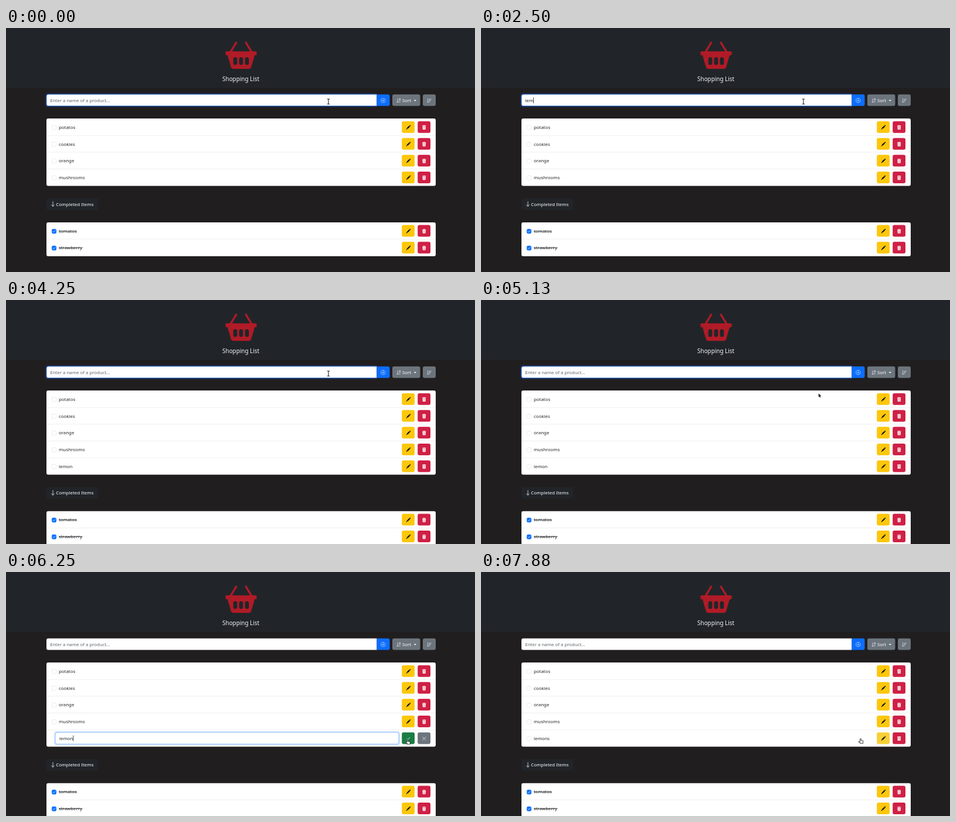
Write an HTML page with a canvas that moves like this. It is 800 px wide and 418 px high and loops after 8 s.

```html
<!DOCTYPE html>
<html lang="en">
<head>
<meta charset="utf-8">
<title>Shopping List</title>
<style>
html, body { margin: 0; width: 100%; height: 100%; overflow: hidden; background: #211e20; }
canvas { display: block; width: 800px; height: 418px; }
</style>
</head>
<body>
<canvas id="stage"></canvas>
<script>
const canvas = document.getElementById('stage');
const ctx = canvas.getContext('2d');
const ratio = window.devicePixelRatio || 1;
canvas.width = 800 * ratio;
canvas.height = 418 * ratio;

const LOOP = 8000, STEP = 125;
const ROW = 28.75, LEFT = 69, WIDTH = 664, LIST = 155.1, BAR = 113.7;
const INK = '#212529', PAGE = '#211e20', BLUE = '#0d6efd', GRAY = '#6c757d', RED = '#cf2045';
const YELLOW = '#fcc70b', YELLOW_HOVER = '#f7d036', GREEN = '#229150', GREEN_HOVER = '#1b7c45';
const TODO = ['potatos', 'cookies', 'orange', 'mushrooms'];
const DONE = ['tomatos', 'strawberry'];

// Moments of the story, in ms
const CLEAR = 4000, ADD = 4250, EDIT = 6250, PLURAL = 7000, SAVE = 7750;

// Pointer stops, and the moves between them
const field = { x: 550, y: 126 }, edge = { x: 680, y: 295 }, target = { x: 685, y: 287 };
const rest = { x: 661.5, y: 302 }, away = { x: 647.5, y: 285.5 };
const MOVES = [
  { start: 4875, end: 5750, to: edge },
  { start: 5750, end: 5875, to: target },
  { start: 6375, end: 6750, to: rest },
  { start: 7250, end: 7500, to: target },
  { start: 7750, end: 7875, to: away }
];

function pointer(t) {
  let { x, y } = field;
  for (const { start, end, to } of MOVES) {
    const k = Math.min(1, Math.max(0, (t - start) / (end - start)));
    const ease = k * k * (3 - 2 * k);
    x += (to.x - x) * ease;
    y += (to.y - y) * ease;
  }
  return [x, y];
}

// Letters typed so far in a run of keys that starts at a given time
function keys(t, start, count) {
  return Math.min(count, Math.max(0, Math.floor((t - start) / 250) + 1));
}

function box(x, y, w, h, r, fill, stroke, width = 0.5) {
  ctx.beginPath();
  ctx.roundRect(x, y, w, h, r);
  if (fill) { ctx.fillStyle = fill; ctx.fill(); }
  if (stroke) { ctx.strokeStyle = stroke; ctx.lineWidth = width; ctx.stroke(); }
}

function text(str, x, y, color = INK, size = 7.85, align = 'left') {
  ctx.font = `${size}px "Noto Sans", "Open Sans", sans-serif`;
  ctx.textAlign = align;
  ctx.fillStyle = color;
  ctx.fillText(str, x, y);
  return ctx.measureText(str).width;
}

function line(color, width, ...points) {
  ctx.strokeStyle = color;
  ctx.lineWidth = width;
  ctx.lineCap = ctx.lineJoin = 'round';
  ctx.beginPath();
  points.forEach(([x, y]) => ctx.lineTo(x, y));
  ctx.stroke();
}

function poly(color, ...points) {
  ctx.fillStyle = color;
  ctx.beginPath();
  points.forEach(([x, y]) => ctx.lineTo(x, y));
  ctx.closePath();
  ctx.fill();
}

// Runs a drawing in local units around x, y
function place(x, y, scale, draw, angle = 0) {
  ctx.save();
  ctx.translate(x, y);
  ctx.rotate(angle);
  ctx.scale(scale, scale);
  draw();
  ctx.restore();
}

// Icons live on a 16 unit grid around their centre
const icon = (draw, x, y, size = 8.2) => place(x, y, size / 16, draw);

// Vertical arrow; dir is 1 for down and -1 for up
function shaft(x, dir, width, head = 3) {
  const tip = 6.5 * dir;
  line('#fff', width, [x, -tip], [x, tip]);
  line('#fff', width, [x - head, tip - head * dir], [x, tip], [x + head, tip - head * dir]);
}

const icons = {
  basket() {
    const red = '#b01b27';
    for (const side of [-1, 1]) line(red, 1, [2.5 * side, -6.5], [5.5 * side, -1.5]);
    box(-8, -2, 16, 2, 0.5, red);
    poly(red, [-7, -0.2], [7, -0.2], [5.1, 6.4], [4.3, 7], [-4.3, 7], [-5.1, 6.4]);
    for (const x of [-3, 0, 3]) box(x - 1, 1, 2, 4, 1, INK);
  },
  pencil() {
    place(0, 0, 1, () => {
      box(-2, -10, 4, 3, 0.6, '#000');
      box(-2, -6, 4, 11, 0, '#000');
      poly('#000', [-2, 6], [2, 6], [0, 10]);
    }, Math.PI / 4);
  },
  trash() {
    box(-6.5, -6.4, 13, 1.9, 0.8, '#fff');
    box(-2.5, -7.7, 5, 2, 0.8, '#fff');
    poly('#fff', [-5.6, -3.6], [5.6, -3.6], [4.8, 7.5], [-4.8, 7.5]);
    for (const x of [-2.4, 0, 2.4]) line(RED, 0.7, [x, -1.8], [x, 5]);
  },
  plus() {
    box(-7.4, -7.4, 14.8, 14.8, 7.4, null, '#fff', 1);
    line('#fff', 1, [0, -3.5], [0, 3.5]);
    line('#fff', 1, [-3.5, 0], [3.5, 0]);
  },
  swap() {
    shaft(-3.5, 1, 1.2);
    shaft(3.5, -1, 1.2);
  },
  sort() {
    shaft(-4.5, 1, 1.1, 2);
    for (let i = 0; i < 4; i++) line('#fff', 1, [-0.5, 3 * i - 4.5], [6.5 - 2 * i, 3 * i - 4.5]);
  },
  down() { shaft(0, 1, 1.2, 4); },
  check() { line('#fff', 1.6, [-5, 0.5], [-1.5, 4], [5, -3.8]); },
  cross() {
    for (const s of [-5.5, 5.5]) line('#fff', 1.3, [-s, -5.5], [s, 5.5]);
  }
};

const cursors = {
  beam() {
    for (const [color, width] of [['#fff', 2.4], ['#222', 1.1]]) {
      line(color, width, [0, -4], [0, 4]);
      for (const y of [-4.3, 4.3]) line(color, width, [-1.8, y], [1.8, y]);
    }
  },
  arrow() {
    const shape = [[0, 0.5], [0, 7], [1.6, 5.7], [2.7, 8], [3.6, 7.6], [2.6, 5.2], [4.7, 5], [0, 0.5]];
    line('#fff', 1.6, ...shape);
    poly('#222', ...shape);
  },
  hand() {
    for (const [grow, color] of [[0.5, '#222'], [-0.3, '#fff']]) {
      const part = (x, y, w, h) => box(x - grow, y - grow, w + 2 * grow, h + 2 * grow, 1, color);
      part(-0.7, 0.2, 1.5, 6);
      part(-0.7, 3.5, 4.8, 4.5);
      part(-3, 4.7, 3.5, 1.6);
    }
  }
};

function button(y, x, color, draw) {
  box(x, y - 10, 21.8, 20, 3, color);
  icon(draw, x + 11, y + 0.5, 8);
}

function caret(x, y) {
  ctx.fillStyle = INK;
  ctx.fillRect(x, y - 5, 0.8, 10);
}

function item(name, y, done, hover) {
  box(78.3, y - 3, 7.4, 7.4, 2, done ? BLUE : '#fff', done ? BLUE : '#dcdfe3', 0.6);
  if (done) icon(icons.check, 82, y + 0.7, 6.5);
  const w = text(name, 90, y + 3);
  if (done) line(INK, 0.7, [90, y + 0.5], [90 + w, y + 0.5]);
  button(y, 675.2, hover ? YELLOW_HOVER : YELLOW, icons.pencil);
  button(y, 702.2, RED, icons.trash);
}

function editor(str, y, hover) {
  box(82.2, y - 11.8, 589.6, 23.6, 4.5, '#c2dbfe');
  box(84.2, y - 9.8, 585.6, 19.6, 3, '#fff', '#86b7fe', 0.6);
  caret(91 + text(str, 91, y + 3), y + 0.2);
  button(y, 675.2, hover ? GREEN_HOVER : GREEN, icons.check);
  button(y, 702.2, GRAY, icons.cross);
}

function list(top, count, drawRow) {
  box(LEFT, top, WIDTH, count * ROW + 0.5, 3, '#fff');
  for (let i = 0; i < count; i++) {
    const y = top + i * ROW;
    ctx.fillStyle = '#dfe0e2';
    if (i) ctx.fillRect(LEFT, y, WIDTH, 0.5);
    drawRow(i, y + 14.7);
  }
}

function header() {
  ctx.fillStyle = INK;
  ctx.fillRect(0, 0, 800, 102.5);
  icon(icons.basket, 401, 46.7, 53.2);
  text('Shopping List', 400.6, 91, '#f4f5f6', 9.9, 'center');
}

function toolbar(t) {
  const focus = t < EDIT, middle = 124.2, base = 126.8, h = 19.8;
  if (focus) box(67, BAR - 2, 567, h + 4, 4.5, '#1a3058');
  box(LEFT, BAR, 563.5, h, [3, 0, 0, 3], '#fff');
  box(632.5, BAR, 22, h, [0, 3, 3, 0], BLUE);
  if (focus) box(LEFT, BAR, 563.5, h, [3, 0, 0, 3], null, '#3470cc', 0.9);
  icon(icons.plus, 643.3, middle);

  const letters = t < CLEAR ? keys(t, 2000, 3) + keys(t, 3000, 2) : 0;
  const w = letters ? text('lemon'.slice(0, letters), 75.3, base) : 0;
  if (!letters) text('Enter a name of a product...', 75.3, base, '#5d646b');
  const blink = (t >= 750 && t < 1000) || t >= 5500;
  if (focus && (letters || blink)) caret(75.3 + w, 124);

  box(659, BAR, 47.5, h, 3, GRAY);
  icon(icons.swap, 670, middle);
  text('Sort', 676, base, '#fff');
  poly('#fff', [695.6, 123.2], [700, 123.2], [697.8, 125.5]);
  box(711, BAR, 22, h, 3, GRAY);
  icon(icons.sort, 722, middle);
}

function draw(t) {
  ctx.setTransform(ratio, 0, 0, ratio, 0, 0);
  ctx.fillStyle = PAGE;
  ctx.fillRect(0, 0, 800, 418);
  header();
  toolbar(t);

  const [mx, my] = pointer(t);
  const over = mx > 675 && mx < 697 && my > 275 && my < 295;
  const editing = t >= EDIT && t < SAVE, saved = t >= SAVE;
  const items = t < ADD ? TODO : [...TODO, t < PLURAL ? 'lemon' : 'lemons'];
  list(LIST, items.length, (i, y) => {
    const last = i === TODO.length;
    if (last && editing) editor(items[i], y, over);
    else item(items[i], y, false, last && (over || saved));
  });

  const shift = (items.length - TODO.length) * ROW;
  box(LEFT, 291.7 + shift, 88, 20, 3, INK);
  icon(icons.down, 80, 301.5 + shift, 10);
  text('Completed Items', 85.3, 304.6 + shift, '#fff', 7.95);
  list(332.9 + shift, DONE.length, (i, y) => item(DONE[i], y, true, false));

  const kind = my < BAR + 20 ? 'beam' : over || saved ? 'hand' : 'arrow';
  place(mx, my, 1, cursors[kind]);
}

function tick(now) {
  draw(Math.floor((now % LOOP) / STEP) * STEP);
  requestAnimationFrame(tick);
}
requestAnimationFrame(tick);
</script>
</body>
</html>
```
